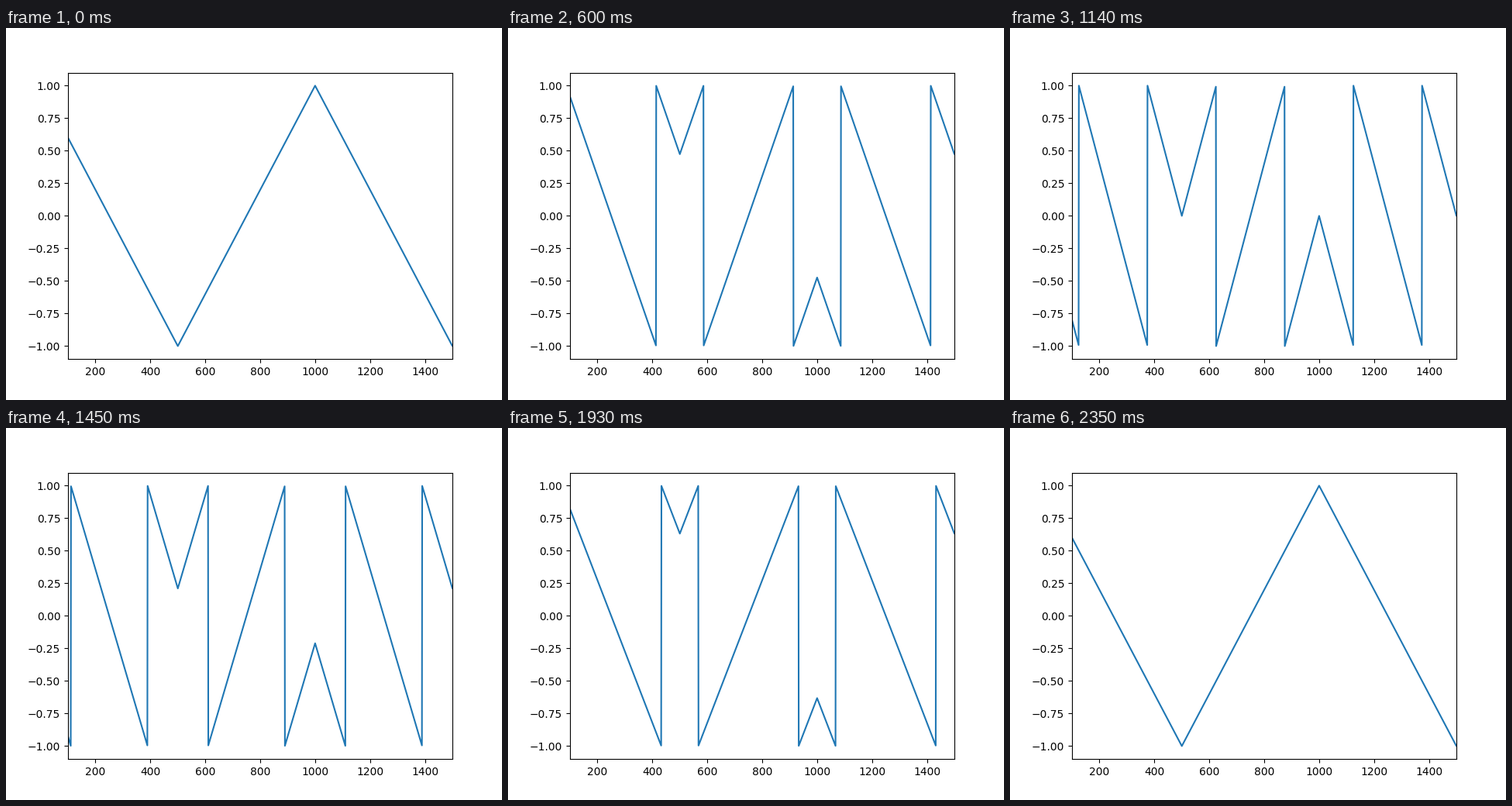
A matplotlib script that plays this animation: 640x480 px, repeating every 2410 ms.

```python
import numpy as np
import matplotlib.pyplot as plt
from matplotlib.animation import FuncAnimation

TICK = 10          # ms per animation frame
LOOP = 2410        # ms per loop
STEP = 60          # ms each amplitude is held
TOP = 19           # steps from smallest to largest amplitude
FALL_START = 1270  # the largest amplitude is held a little longer
PERIOD = 1000

x = np.arange(1601)
# The tiny phase shift keeps values at exactly +-1 on the right side of the wrap.
phase = ((x + 1e-6) / PERIOD) % 1
triangle = np.abs(4 * phase - 2) - 1


def wrap(values):
    """Fold values back into the range -1 to 1."""
    return (values + 1) % 2 - 1


def amplitude(ms):
    if ms < FALL_START:
        level = min(ms // STEP, TOP)
    else:
        level = TOP - 1 - (ms - FALL_START) // STEP
    return 1 + level / TOP


fig, ax = plt.subplots(figsize=(6.4, 4.8), dpi=100)
ax.set_xlim(100, 1500)
ax.set_ylim(-1.1, 1.1)
line, = ax.plot(x, triangle, color="#1f77b4", lw=1.5)


def update(i):
    line.set_ydata(wrap(amplitude(i * TICK) * triangle))
    return line,


anim = FuncAnimation(fig, update, frames=LOOP // TICK, interval=TICK,
                     repeat=True, repeat_delay=0)
plt.show()
```
